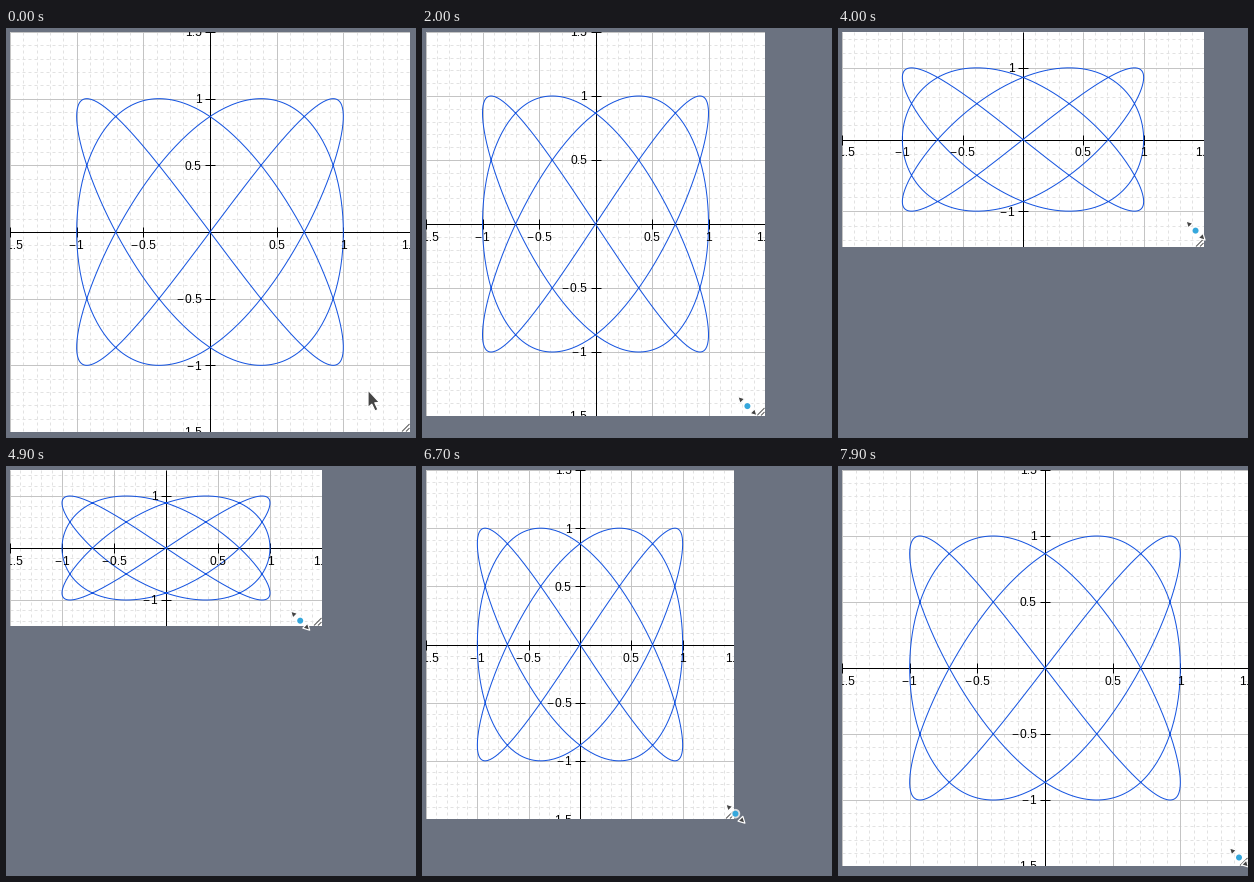
Write a matplotlib script that moves like this. It is 410x410 px and loops after 8 s.

```python
import numpy as np
import matplotlib.pyplot as plt
from matplotlib.animation import FuncAnimation
from matplotlib.collections import LineCollection
from matplotlib.patches import Circle, Polygon, Rectangle

SIZE, DPI = 410, 82
PX = 72 / DPI            # points per pixel
EDGE = 4                 # left and top margin of the board
GREY = "#6b7280"
DARK = "#444444"

# frame, right edge, bottom edge of the board
KEYS = np.array([
    (16, 404, 404), (20, 343, 388), (22, 300, 381), (24, 262, 385),
    (26, 260, 390), (28, 320, 373), (33, 335, 356), (39, 366, 238),
    (44, 368, 142), (49, 316, 160), (50, 284, 168), (55, 190, 219),
    (59, 200, 263), (60, 206, 281), (64, 267, 332), (67, 312, 353),
    (68, 338, 361), (73, 408, 399), (75, 418, 408), (78, 413, 403),
    (79, 410, 400)], float)
MOVING = [*range(17, 25), 26, 28, *range(31, 45), *range(47, 76), 78, 79]

fig = plt.figure(figsize=(SIZE / DPI, SIZE / DPI), dpi=DPI, facecolor="white")
ax = fig.add_axes([0, 0, 1, 1])
ax.set_xlim(0, SIZE)
ax.set_ylim(SIZE, 0)
ax.axis("off")


def lines(color, width=1, z=1, **kw):
    col = LineCollection([], colors=color, linewidths=width * PX, zorder=z, **kw)
    ax.add_collection(col, autolim=False)
    return col


def shape(z, **kw):
    return ax.add_patch(Polygon(np.zeros((3, 2)), zorder=z, **kw))


minor = lines("#e2e2e2", linestyles=[(0, (3, 3))], capstyle="butt")
major = lines("#c4c4c4", z=2)
axes_lines = lines("black", z=3)
ticks = lines("black", z=3)
curve, = ax.plot([], [], color="#1453e0", lw=PX, zorder=4)
handle = lines("#555555", z=11)
labels = [ax.text(0, 0, "", family="Liberation Sans", fontsize=12 * PX,
                  color="black", va="baseline", zorder=5) for _ in range(12)]

masks = [ax.add_patch(Rectangle((0, 0), SIZE, EDGE, fc=GREY, lw=0, zorder=10,
                                antialiased=False)) for _ in range(4)]
masks[1].set_bounds(0, 0, EDGE, SIZE)

outline = dict(fc=DARK, ec="white", lw=1.2 * PX, joinstyle="round")
pointer = shape(20, **outline)
heads = [shape(20, **outline) for _ in range(2)]
halo = ax.add_patch(Circle((0, 0), 4.8, fc="white", alpha=0.75, lw=0, zorder=21))
dot = ax.add_patch(Circle((0, 0), 3, fc="#35a7dc", lw=0, zorder=22))

ARROW = np.array([(0, 0), (0, 17.5), (3.8, 14.2), (7, 21), (10, 19.6),
                  (6.8, 12.8), (11.5, 12.5)])
HEAD = np.array([(-9.5, -9.5), (-2.6, -7.4), (-7.4, -2.6)])
T = np.linspace(0, 2 * np.pi, 800)
X, Y = np.sin(3 * T), np.sin(4 * T)


def corner(f):
    return np.array([np.interp(f, KEYS[:, 0], KEYS[:, i]) for i in (1, 2)])


def tick_step(unit):
    return next(s for s in (0.5, 1, 2, 5) if s * unit >= 45)


def marks(step):
    n = int(1.5 / step + 1e-9)
    return [k * step for k in range(-n, n + 1)]


def caption(v):
    return f"{v:g}".replace("-", "\u2212\u200a")


def draw_board(right, bottom):
    cx, cy = (EDGE + right) / 2, (EDGE + bottom) / 2
    ux, uy = (right - EDGE) / 3, (bottom - EDGE) / 3
    sx, sy = tick_step(ux), tick_step(uy)

    def vert(v):
        x = cx + v * ux
        return [(x, EDGE), (x, bottom)]

    def horiz(v):
        y = cy - v * uy
        return [(EDGE, y), (right, y)]

    minor.set_segments([vert(v) for v in marks(sx / 5)]
                       + [horiz(v) for v in marks(sy / 5)])
    xs = [v for v in marks(sx) if v]
    ys = [v for v in marks(sy) if v]
    major.set_segments([vert(v) for v in xs] + [horiz(v) for v in ys])
    axes_lines.set_segments([vert(0), horiz(0)])
    ticks.set_segments(
        [[(cx + v * ux, cy - 5), (cx + v * ux, cy + 5)] for v in xs]
        + [[(cx - 5, cy - v * uy), (cx + 5, cy - v * uy)] for v in ys])
    curve.set_data(cx + X * ux, cy - Y * uy)

    spots = [(cx + v * ux, cy + 17, v, "center") for v in xs]
    spots += [(cx - 8.5, cy - v * uy + 4.5, v, "right") for v in ys]
    for i, text in enumerate(labels):
        text.set_visible(i < len(spots))
        if i < len(spots):
            x, y, v, align = spots[i]
            text.set_position((x, y))
            text.set_text(caption(v))
            text.set_ha(align)

    handle.set_segments([[(right - d, bottom - 0.5), (right - 0.5, bottom - d)]
                         for d in (8, 4)])
    masks[2].set_bounds(right, 0, SIZE, SIZE)
    masks[3].set_bounds(0, bottom, SIZE, SIZE)


def draw_cursor(f, spot):
    resizing, pressed = f >= 7, f >= 10
    pointer.set_visible(not resizing)
    u = np.clip((f - 2) / 5, 0, 1)
    u = u * u * (3 - 2 * u)
    pointer.set_xy(ARROW + (362 + 32.5 * u, 362 + 33 * u))
    for head, sign in zip(heads, (1, -1)):
        head.set_visible(resizing)
        head.set_xy(sign * HEAD * (1 if pressed else 0.9) + spot)
    for disc in (halo, dot):
        disc.set_visible(pressed)
        disc.center = tuple(spot)


def update(f):
    held = max([m for m in MOVING if m <= f], default=0)
    # the cursor runs slightly ahead of the board while dragging
    lead = 0.4 if held + 1 in MOVING and held else 0
    right, bottom = np.round(corner(held))
    draw_board(right, bottom)
    draw_cursor(f, corner(held + lead) - (9, 8.5))
    return []


anim = FuncAnimation(fig, update, frames=80, interval=100, init_func=lambda: update(0),
                     blit=False, repeat=True)
plt.show()
```
